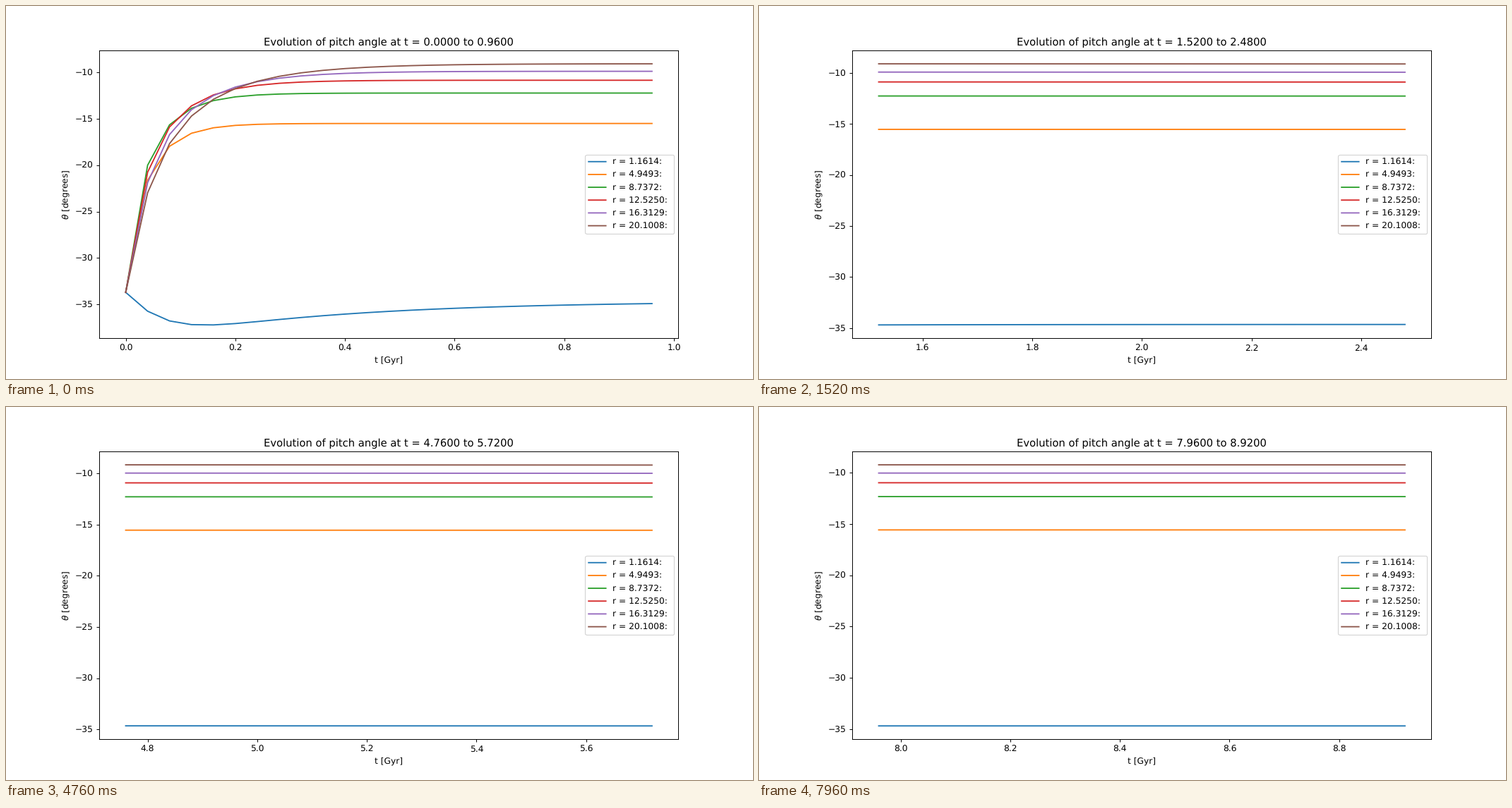
Write a matplotlib script that moves like this. It is 1058 px wide and 529 px high and loops after 8 s.

```python
import numpy as np
import matplotlib.pyplot as plt
from matplotlib.animation import FuncAnimation

DT = 0.04        # Gyr per step
WINDOW = 25      # samples visible at once
FRAMES = 200
START = 33.69    # initial angle below zero, degrees

times = np.arange(FRAMES + WINDOW) * DT
drift = (1 + np.tanh((times - 4.5) / 3)) / 2


def dip(limit, sag):
    """Innermost radius: a fast fall, then a slow recovery."""
    slow = 4.55 * np.exp(-2.95 * times)
    fast = (limit + 4.55 - START) * np.exp(-14.4 * times - 27 * times**2)
    return -(limit + slow - fast + sag * drift)


def settle(limit, rate, sag):
    """Exponential approach to the limit in angle ** -1/4, plus a late drift."""
    first, last = START**-0.25, limit**-0.25
    angle = (last + (first - last) * np.exp(-rate * times))**-4
    return -(angle + sag * drift)


thetas = [
    dip(34.63, 0.05),
    settle(15.52, 19.85, 0.06),
    settle(12.245, 16.5, 0.09),
    settle(10.865, 12.5, 0.125),
    settle(9.897, 9.57, 0.15),
    settle(9.085, 7.5, 0.16),
]
radii = np.linspace(1.1614, 20.1008, len(thetas))

plt.rcParams["text.hinting"] = "none"
fig, ax = plt.subplots(figsize=(12, 6), dpi=88.1667)
lines = [ax.plot([], [], label=f"r = {r:.4f}: ")[0] for r in radii]
ax.set_xlabel("t [Gyr]")
ax.set_ylabel(r"$\theta$ [degrees]")
title = ax.set_title("")
legend = ax.legend(loc="center right", labelspacing=0.535)
for line in lines + legend.get_lines():
    line.set_snap(False)


def update(step):
    view = slice(step, step + WINDOW)
    t = times[view]
    for line, theta in zip(lines, thetas):
        line.set_data(t, theta[view])
    ax.relim()
    ax.autoscale_view()
    title.set_text(f"Evolution of pitch angle at t = {t[0]:.4f} to {t[-1]:.4f}")
    return lines


anim = FuncAnimation(fig, update, frames=FRAMES, interval=40,
                     init_func=lambda: update(0), repeat=True, repeat_delay=0)
plt.show()
```
